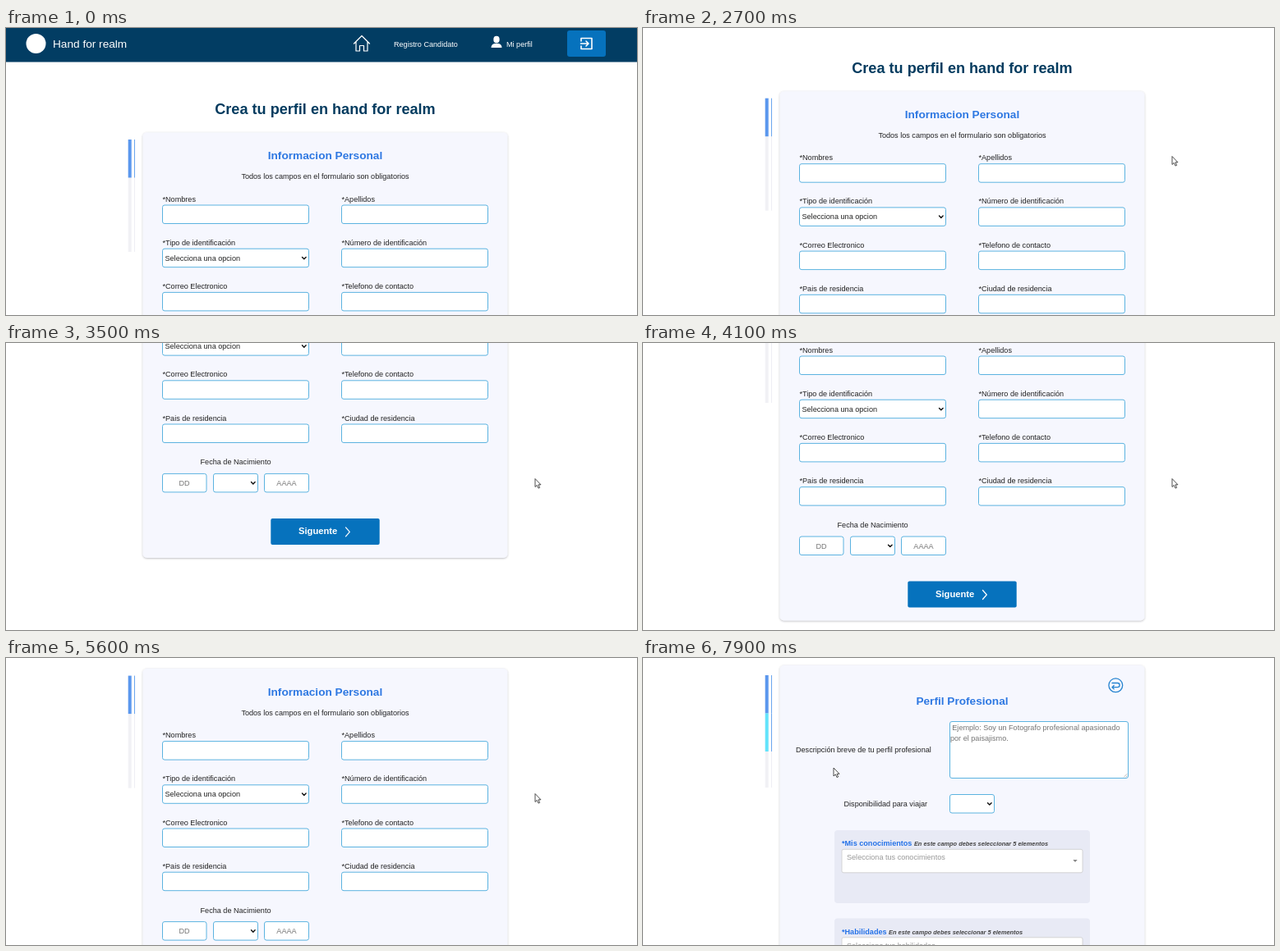
Animation of 768x350 px, one loop 8 s. Source, as an HTML page:

```html
<!DOCTYPE html>
<html lang="es">
<head>
<meta charset="utf-8">
<title>Perfil</title>
<style>
  html, body { margin: 0; width: 100%; height: 100%; overflow: hidden; background: #fff; }
  svg { display: block; width: 100vw; height: 100vh; }
  text { font: 9.1px "Liberation Sans", Arial, sans-serif; fill: #222; white-space: pre; }
  .mid { text-anchor: middle; }
  .hint { fill: #757575; }
  .pale { fill: #999; }
  .white { fill: #fff; }
  .brand { font-size: 13.65px; fill: #fff; }
  .title { font-size: 18.1px; font-weight: bold; fill: #033b5f; }
  .heading { font-size: 13.65px; font-weight: bold; fill: #2e78e2; }
  .next { font-size: 11.2px; font-weight: bold; fill: #fff; }
  .skill { font-weight: bold; fill: #2472e8; }
  .note { font-size: 7.4px; font-style: italic; fill: #444; }
  .field { fill: #fff; stroke: #5cb3e0; }
  .line { fill: none; stroke-linecap: round; stroke-linejoin: round; }
</style>
</head>
<body>
<svg viewBox="0 0 768 350" preserveAspectRatio="none">
  <defs>
    <linearGradient id="glow">
      <stop offset="0" stop-color="#0b65a4"/>
      <stop offset=".5" stop-color="#3ba3cb"/>
      <stop offset="1" stop-color="#8cf1ff"/>
    </linearGradient>
    <filter id="shadow" x="-5%" y="-5%" width="110%" height="110%">
      <feDropShadow dx="0" dy=".8" stdDeviation="1" flood-color="#334" flood-opacity=".35"/>
    </filter>
  </defs>
  <g id="page">
    <g id="top"></g>
    <g id="bar"></g>
    <g id="personal"></g>
    <g id="profile"></g>
  </g>
  <path id="arrow" d="M0 0V10L2.3 7.9 4 11.6 5.6 10.9 4 7.3H7Z" fill="#fff" stroke="#222" stroke-width=".8"/>
  <path id="hand" d="M-1.3 7V.8Q0-.8 1.2.8V5L4.5 5.6Q5.6 6 5.4 7.5L4.4 13H-1L-4.4 8.6Q-4.6 7.2-3.2 7.2L-1.3 8.6Z"
        fill="#fff" stroke="#222" stroke-width=".8"/>
</svg>
<script>
const $ = id => document.getElementById(id);
const text = (x, y, str, cls = '') => `<text x="${x}" y="${y}" class="${cls}">${str}</text>`;
const rect = (x, y, w, h, fill, r = 0, extra = '') =>
  `<rect x="${x}" y="${y}" width="${w}" height="${h}" rx="${r}" fill="${fill}" ${extra}/>`;
const line = (d, color, width) => `<path class="line" d="${d}" stroke="${color}" stroke-width="${width}"/>`;
const field = (x, y, w, h = 22.5) =>
  `<rect class="field" x="${x}" y="${y}" width="${w}" height="${h}" rx="2.5"/>`;
const select = (x, y, w) =>
  field(x, y, w) + line(`M${x + w - 8} ${y + 10.2}l2.3 2.4 2.3-2.4`, '#111', 1.4);
const card = (y, h) => rect(166.5, y, 444, h, '#f6f7fe', 5, 'filter="url(#shadow)"');

const BRAND = 'Hand for realm';

$('top').innerHTML =
  rect(0, 0, 768, 41.5, '#023d63') +
  '<circle cx="36.5" cy="19" r="12" fill="#fff"/>' +
  text(57, 24, BRAND, 'brand') +
  line('M423.5 19L433 9.5 442.5 19M426 17V28H430.5V21.5H435.5V28H440V17', '#fff', 1.2) +
  text(472, 23.3, 'Registro Candidato', 'white') +
  '<ellipse cx="597" cy="14" rx="3.7" ry="4.3" fill="#fff"/>' +
  '<path d="M590.5 24Q590.5 18.8 597 18.8T603.5 24Z" fill="#fff"/>' +
  text(609, 23.3, 'Mi perfil', 'white') +
  rect(683, 3, 47, 32, '#0672bd', 3) +
  line('M700 16V12.5H713V25.5H700V22M699.5 19H708.5M706 16L709 19 706 22', '#fff', 1.6) +
  text(388.5, 105, `Crea tu perfil en ${BRAND.toLowerCase()}`, 'title mid');

$('bar').innerHTML =
  rect(148.7, 136, 4, 137, '#f1f1f5') + rect(156, 136, 1, 137, '#eeeef4') +
  rect(148.7, 136, 4, 46.5, '#5a97ee') + rect(156, 136, 1, 46.5, '#6ba6ee') +
  `<g id="second">${rect(148.7, 182.5, 4, 46.5, '#62e4fb') + rect(156, 182.5, 1, 46.5, '#6ba6ee')}</g>`;

const labels = [
  ['Nombres', 'Apellidos'],
  ['Tipo de identificación', 'Número de identificación'],
  ['Correo Electronico', 'Telefono de contacto'],
  ['Pais de residencia', 'Ciudad de residencia']
];
const rows = labels.map((pair, row) => pair.map((label, col) => {
  const x = 190.5 + col * 218, y = 216 + row * 53.2;
  const input = row === 1 && col === 0 ? select : field;
  return text(x, y - 4.4, '*' + label) + input(x, y, 178);
}).join('')).join('');

$('personal').innerHTML =
  card(127.5, 411) +
  text(388.5, 160.3, 'Informacion Personal', 'heading mid') +
  text(388.5, 184.2, 'Todos los campos en el formulario son obligatorios', 'mid') +
  rows + text(193.5, 283.7, 'Selecciona una opcion') +
  text(279.5, 425, 'Fecha de Nacimiento', 'mid') +
  field(190.5, 436, 53.5) + text(217, 450.5, 'DD', 'hint mid') +
  select(252.5, 436, 54) +
  field(314.5, 436, 54) + text(341.5, 450.5, 'AAAA', 'hint mid') +
  '<g id="next">' + rect(322.3, 490.5, 132.4, 32, '#0672bd', 2) +
  rect(322.3, 490.5, 132.4, 32, 'url(#glow)', 2, 'id="hover"') +
  text(356, 510, 'Siguente', 'next') +
  line('M413.5 501.5L418.3 507 413.5 512.5', '#fff', 1.2) + '</g>';

const skillBox = (y, name) =>
  rect(233, y, 311, 89, '#e8eaf5', 4) +
  `<text x="242" y="${y + 19}" class="skill">*${name} <tspan class="note">En este campo debes seleccionar 5 elementos</tspan></text>` +
  rect(242, y + 23.3, 293, 28.5, '#fff', 2, 'stroke="#ccc" stroke-width=".8"') +
  text(248, y + 36.3, `Selecciona tus ${name.replace('Mis ', '').toLowerCase()}`, 'pale') +
  `<path d="M523.3 ${y + 36}h5.4l-2.7 3z" fill="#888"/>`;

$('profile').innerHTML =
  card(124, 500) +
  text(388.5, 172, 'Perfil Profesional', 'heading mid') +
  '<circle cx="575.3" cy="148.3" r="8.4" fill="none" stroke="#2684d0" stroke-width="1.3"/>' +
  line('M571 145.5H577.5A2.6 2.6 0 0 1 577.5 150.7H571M573.2 148.5L571 150.7 573.2 152.9', '#2684d0', 1.3) +
  text(186, 230, 'Descripción breve de tu perfil profesional') +
  field(373.5, 192.5, 217, 69) +
  text(376.3, 202.6, 'Ejemplo: Soy un Fotografo profesional apasionado', 'hint') +
  text(374, 216.2, 'por el paisajismo.', 'hint') +
  line('M585.5 260L589 256.5M588 260L589 259', '#888', .6) +
  text(244.5, 296, 'Disponibilidad para viajar') +
  select(373.5, 281.5, 54) +
  skillBox(325, 'Mis conocimientos') +
  skillBox(432.5, 'Habilidades');

// Keyframes: [time, value, ...]
const scrollKeys = [
  [2300, 0], [2700, 50.3], [3300, 250], [3500, 276.6], [3600, 285], [3800, 270], [4100, 200],
  [4600, 70.3], [4700, 57], [4900, 57], [5300, 114.4], [5600, 114.4], [5900, 171.5],
  [7200, 171.5], [7600, 115]
];
const cursorKeys = [
  [600, 12, 336], [750, 97, 262], [900, 150, 195], [1050, 178, 170], [1250, 113, 146], [1400, 64, 155],
  [1650, 150, 230], [1950, 350, 254], [2300, 567, 180], [2600, 644, 156.5], [3200, 644, 156.5],
  [3400, 644, 165.5], [5700, 644, 165.5], [6000, 686, 140], [6400, 529, 108], [6700, 408, 326],
  [7200, 408, 326], [7700, 232, 134]
];
function at(keys, t) {
  const i = keys.findIndex(k => k[0] > t);
  if (i === 0) return keys[0].slice(1);
  if (i < 0) return keys[keys.length - 1].slice(1);
  const a = keys[i - 1], b = keys[i], p = (t - a[0]) / (b[0] - a[0]);
  return a.slice(1).map((v, n) => v + (b[n + 1] - v) * p);
}
const show = (id, on) => $(id).setAttribute('visibility', on ? 'visible' : 'hidden');
const move = (id, x, y) => $(id).setAttribute('transform', `translate(${x} ${y})`);

function draw(time) {
  const t = Math.floor(time % 8000 / 100) * 100;
  const second = t >= 7100;
  const pointing = t >= 6700 && !second;
  const hover = Math.min(1, Math.max(0, (t - 6600) / 200));
  const [x, y] = at(cursorKeys, t);

  move('page', 0, -at(scrollKeys, t)[0]);
  move('next', 4 * hover, 0);
  $('hover').setAttribute('opacity', hover);
  show('personal', !second);
  show('profile', second);
  show('second', second);
  move('arrow', x, y);
  move('hand', x, y);
  show('arrow', t >= 600 && !pointing);
  show('hand', pointing);
}

const start = performance.now();
function tick() {
  draw(performance.now() - start);
  requestAnimationFrame(tick);
}
tick();
</script>
</body>
</html>
```
